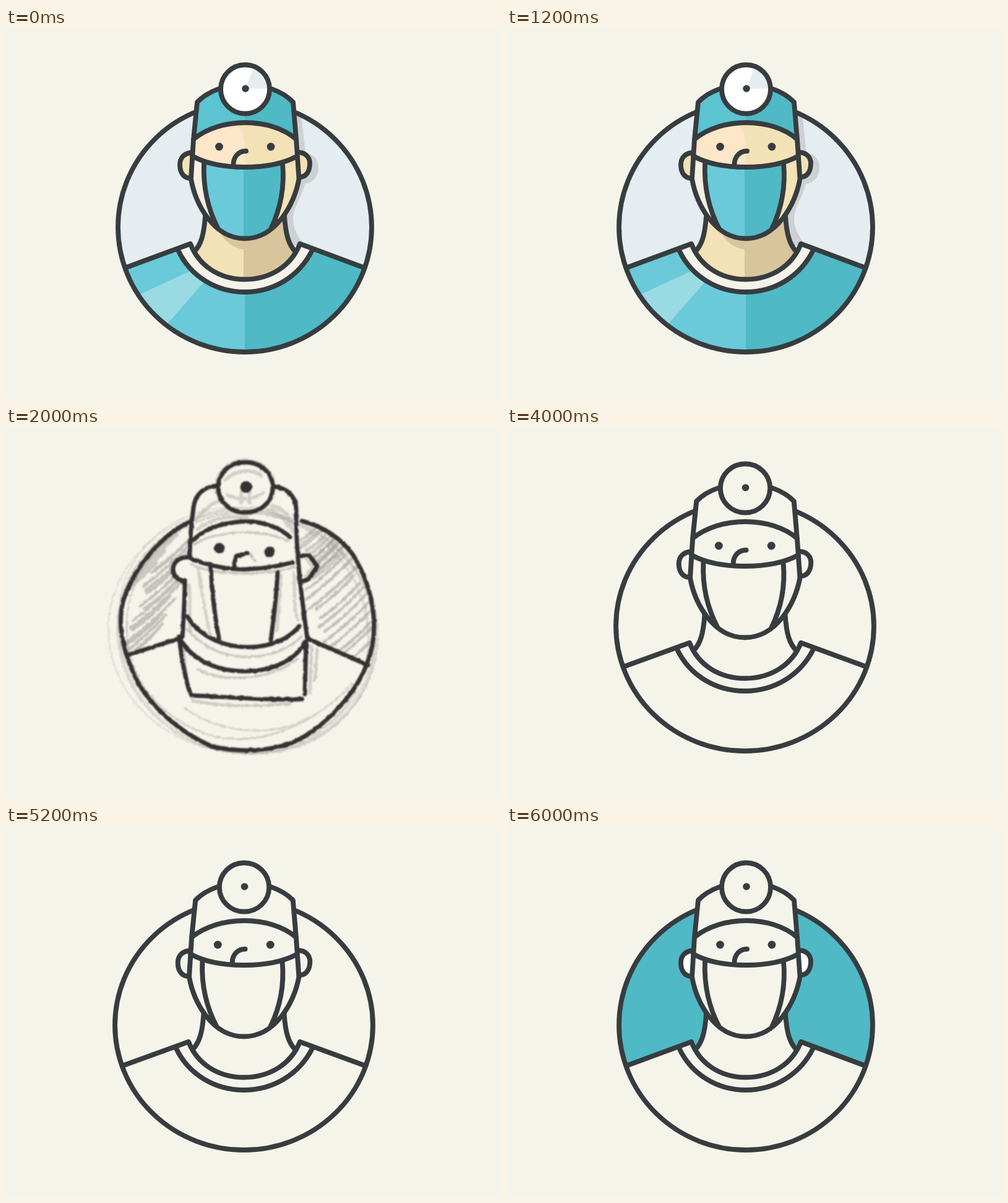
Animation, 800 px wide and 600 px high, one loop 8000 ms. Source, as an HTML page:

```html
<!DOCTYPE html>
<html lang="en">
<head>
<meta charset="utf-8">
<title>Surgeon badge</title>
<style>
  html, body { margin: 0; width: 100%; height: 100%; overflow: hidden; background: #f4f4ea; }
  svg { display: block; width: 100vw; height: 100vh; }
  .line { fill: none; stroke: #373c3f; stroke-width: 7.8; stroke-linecap: round; stroke-linejoin: round; }
  .pencil { fill: none; stroke: #353031; stroke-width: 7; stroke-linecap: round; stroke-linejoin: round; }
  .soft { fill: none; stroke: #a19d9a; stroke-linecap: round; }
</style>
</head>
<body>
<svg id="stage" viewBox="0 0 800 600" xmlns="http://www.w3.org/2000/svg"></svg>
<script>
const PAPER = '#f4f4ea', INK = '#373c3f', LEAD = '#353031', TEAL = '#4fb9c6', AQUA = '#6acad9';
const SKIN = '#f2e2b6', PALE = '#e6edf1';

const brim = 'M303 180C346 144 428 144 469 180';
const crown = 'C428 82 345 82 309 120';
const head = `M309 120L303 180L299 244C306 284 335 340.5 386 340.5S466 284 473.5 244L469 180L464 120${crown}Z`;
const maskTop = 'M301 207C326 221 355 225 386 225S446 221 471 207';
const maskLeft = 'M320 219C318 262 329 298 343 325';
const maskRight = 'M447 219C451 262 441 298 428 325';
const mask = `${maskLeft}V345H428V325C441 298 451 262 447 219C430 226 340 226 320 219Z`;
const cap = `${brim}L464 120${crown}Z`;
const inner = 'M298 349C312 385 345 406.5 386 406.5S461 385 475 349';
const outer = 'M278 359C298 402 340 427 386 427S474 402 495 359';
const band = `${inner}L495 359C474 402 432 427 386 427S298 402 278 359Z`;
const body = `${inner}L592 393V540H180V393Z`;
const neckLeft = 'M322 304C320 335 315 350 305 361';
const neckRight = 'M450 304C452 335 457 350 467 361';
const neck = `${neckLeft}C322 391 351 406.5 386 406.5S450 391 467 361C457 350 452 335 450 304Z`;
const earLeft = 'M301 201.5C287 202 281 211 281 221C281 235 288 243 298 243';
const earRight = 'M471 201C484 201 491 209 491 219C491 232 485 241 475 241';
const headShade = 'M460 136L478 146L484 203C497 203 505 212 505 225C505 240 496 251 483 252C477 276 464 290 464 312C466 330 474 338 482 352H440Z';

const fill = (d, color) => `<path d="${d}" fill="${color}"/>`;
const line = (...d) => `<path class="line" d="${d.join('')}"/>`;
const dot = (x, y, r, color = INK) => `<circle cx="${x}" cy="${y}" r="${r}" fill="${color}"/>`;
const clipped = (id, s) => `<g clip-path="url(#${id})">${s}</g>`;
const disc = attrs => `<ellipse cx="386" cy="322" rx="205" ry="202" ${attrs}/>`;

function figure({ back, ear, skin, rich }) {
  const when = s => rich ? s : '';
  return disc(`fill="${back}"`)
    + when(clipped('disc', fill(headShade, '#cdd1d3')))
    + fill(neck, skin)
    + when(clipped('neck', fill('M384 300H480V420H384Z', '#d9c59c') + fill('M346 331C354 346 368 356 384 358V325Z', '#d9c59c')))
    + line(neckLeft, neckRight)
    + clipped('disc', fill(body, PAPER)
      + when(fill(body, AQUA) + clipped('body', fill('M386 340H600V540H386Z', TEAL))
        + fill('M205 436L298 393L325 405L255 485Z', '#9adbe3'))
      + fill(band, '#f4f3ea'))
    + disc('class="line"')
    + line('M195 387L298 349', inner, outer, 'M475 349L577 387')
    + fill(earLeft, ear) + fill(earRight, ear) + line(earLeft, earRight)
    + fill(head, skin)
    + when(clipped('head',
      fill('M290 140H350C372 148 386 168 386 190V230H290Z', '#fee6c8')
      + fill('M290 203C310 216 330 222 345 225V345H290Z', '#f5efe0')
      + fill(mask, AQUA)
      + clipped('mask', fill('M384 200H460V350H384Z', TEAL))
      + fill(cap, '#5cc3d0')
      + clipped('cap', fill('M386 80H480V190H386Z', TEAL))))
    + line('M367.5 221C367.5 208 376 199 388 199')
    + line(head, brim, maskTop, maskLeft, maskRight)
    + dot(344.5, 192, 6.4) + dot(428, 192, 6.4)
    + dot(386.5, 99, 39.5, rich ? '#fff' : PAPER)
    + when(fill('M387 98L400 64C415 69 426 82 427 98Z', PALE))
    + '<circle class="line" cx="386.5" cy="99" r="39.5"/>'
    + dot(387, 98, 5.8);
}

let seed = 11;
const rand = () => (seed = seed * 16807 % 2147483647) / 2147483647;
const spread = n => (rand() - 0.5) * n;

const soft = (d, width, alpha) =>
  `<path class="soft" d="${d}" stroke-width="${width}" opacity="${alpha}"/>`;

// Slanted pencil strokes stepping from one point to another.
function hatch(x0, y0, x1, y1, count, len, width, alpha) {
  let d = '';
  for (let i = 0; i < count; i++) {
    const k = i / (count - 1), l = len * (0.75 + rand() * 0.5);
    const x = x0 + (x1 - x0) * k + spread(6), y = y0 + (y1 - y0) * k + spread(4);
    d += `M${x - l * 0.4} ${y + l * 0.36}Q${x + 4} ${y + 3} ${x + l * 0.4} ${y - l * 0.36}`;
  }
  return soft(d, width, alpha);
}

function sketch() {
  let loose = '';
  for (let i = 0; i < 7; i++) {
    loose += `<ellipse class="soft" cx="${390 + spread(18)}" cy="${332 + spread(14)}" rx="${210 + spread(16)}"
      ry="${196 + spread(12)}" transform="rotate(${20 + spread(40)} 390 332)" stroke-width="2" opacity=".3"/>`;
  }
  const shade = clipped('gaps',
    hatch(262, 172, 215, 240, 11, 66, 5, 0.5)
    + hatch(272, 200, 215, 358, 15, 84, 4.5, 0.6)
    + hatch(494, 165, 520, 225, 10, 60, 5, 0.5)
    + hatch(505, 200, 570, 360, 15, 86, 4.5, 0.6));
  const smudges = loose
    + soft('M307 150C330 120 340 125 350 115M310 165C340 142 370 145 390 146M430 128C450 130 458 145 463 168M424 134C440 140 450 146 456 160', 6, 0.4)
    + soft('M355 85C370 70 395 66 412 78M358 110C380 120 400 118 416 106M380 105V122M393 105V122', 6, 0.4)
    + soft('M304 190C335 168 410 163 455 184M300 222C340 242 430 240 466 226', 4, 0.5)
    + soft('M296 255C300 285 294 310 298 330M311 230C317 270 321 300 330 335M465 235C468 270 464 295 472 312M445 240L438 330', 5, 0.4)
    + soft('M292 326C320 358 350 371 390 372C430 370 460 358 478 338M310 392C350 414 425 410 470 376', 4, 0.5)
    + soft('M288 350C288 390 292 420 303 443C350 452 400 453 460 447M494 355L491 430M503 360L499 410', 5, 0.45)
    + soft('M205 385C230 450 290 492 350 503C420 512 500 480 560 415M290 455C340 494 430 505 490 470', 3, 0.4)
    + soft('M268 215C262 232 270 250 284 252M484 212L495 226L484 242', 4, 0.4)
    + soft('M394 205L402 216', 4, 0.6)
    + '<ellipse class="soft" cx="387" cy="97" rx="48" ry="44" stroke-width="3" opacity=".4"/>';
  const strokes = [
    'M298 153C248 176 204 232 189 283C179 326 191 368 213 413C233 449 277 492 333 517C382 527 428 524 464 510C516 486 565 431 583 384C604 332 597 266 561 207C541 179 511 160 478 152',
    'M387 57C412 57 431 75 431 97C431 121 412 138 387 138C361 138 343 120 343 97C343 74 361 57 387 57Z',
    'M340 95C318 97 306 110 303 130C300 152 297 180 297 212C330 226 365 231 390 230C420 229 445 224 463 219',
    'M431 96C455 98 468 112 469 132C468 200 477 270 487 342L585 385',
    'M302 184C325 159 368 151 400 153C426 157 445 165 459 178',
    'M296 211C282 209 270 218 270 230C271 242 278 248 289 249C289 280 287 310 285 340',
    'M478 208L490 208L503 225L489 246L480 249',
    'M331 228C333 265 338 310 344 342M439 235C437 275 432 315 428 344',
    'M369 226L371 209L390 204',
    'M293 306C310 335 345 355 390 356C430 356 458 342 474 322',
    'M280 339C295 372 335 395 385 395C435 395 468 375 484 348',
    'M196 369L283 341M280 342C284 375 290 410 299 434C350 436 430 443 478 440M485 347L483 432'
  ].map(d => `<path class="pencil" d="${d}"/>`).join('');
  return `<g filter="url(#grain)">${shade}${smudges}</g>
    <g filter="url(#rough)">${strokes}${dot(345, 196, 8.5, LEAD)}${dot(426, 202, 8.5, LEAD)}${dot(388, 97, 9.5, LEAD)}</g>`;
}

const clip = (id, s) => `<clipPath id="${id}">${s}</clipPath>`;
const rough = (id, freq, scale, blur) => `<filter id="${id}" x="0" y="0" width="800" height="600" filterUnits="userSpaceOnUse" color-interpolation-filters="sRGB">
  <feTurbulence type="fractalNoise" baseFrequency="${freq}" numOctaves="2" seed="4" result="n"/>
  <feDisplacementMap in="SourceGraphic" in2="n" scale="${scale}" xChannelSelector="R" yChannelSelector="G"/>
  <feGaussianBlur stdDeviation="${blur}"/></filter>`;

const defs = clip('disc', disc(''))
  + Object.entries({ neck, body, head, mask, cap }).map(([id, d]) => clip(id, `<path d="${d}"/>`)).join('')
  + clip('gaps', '<path d="M296 153C248 176 204 232 189 283C180 320 188 350 196 369L283 341L289 249L270 235L275 212L296 209ZM478 152C511 160 541 179 561 207C592 262 603 326 585 385L490 342L480 250L503 225L490 208L473 206Z"/>')
  + rough('rough', 0.12, 3, 1.1) + rough('grain', 0.2, 5, 1.1);

const plain = { back: PAPER, ear: PAPER, skin: PAPER };
const scenes = [
  figure({ back: PALE, ear: SKIN, skin: SKIN, rich: true }),
  sketch(),
  `<g transform="matrix(1.0167 0 0 1 -7.96 0)">${figure(plain)}</g>`,
  figure({ ...plain, back: TEAL, ear: '#fff' })
];

const stage = document.getElementById('stage');
stage.innerHTML = `<defs>${defs}</defs>` + scenes.map(s => `<g class="scene">${s}</g>`).join('');

// Each scene holds for a quarter of the loop, with hard cuts.
const HOLD = 2000;
document.querySelectorAll('.scene').forEach((el, i) => {
  const steps = [0, 1, 2, 3, 3].map((n, k) => ({
    offset: k / 4, opacity: n === i ? 1 : 0, easing: 'steps(1, end)'
  }));
  const run = el.animate(steps, { duration: HOLD * scenes.length, iterations: Infinity });
  run.startTime = 0;
});
</script>
</body>
</html>
```
